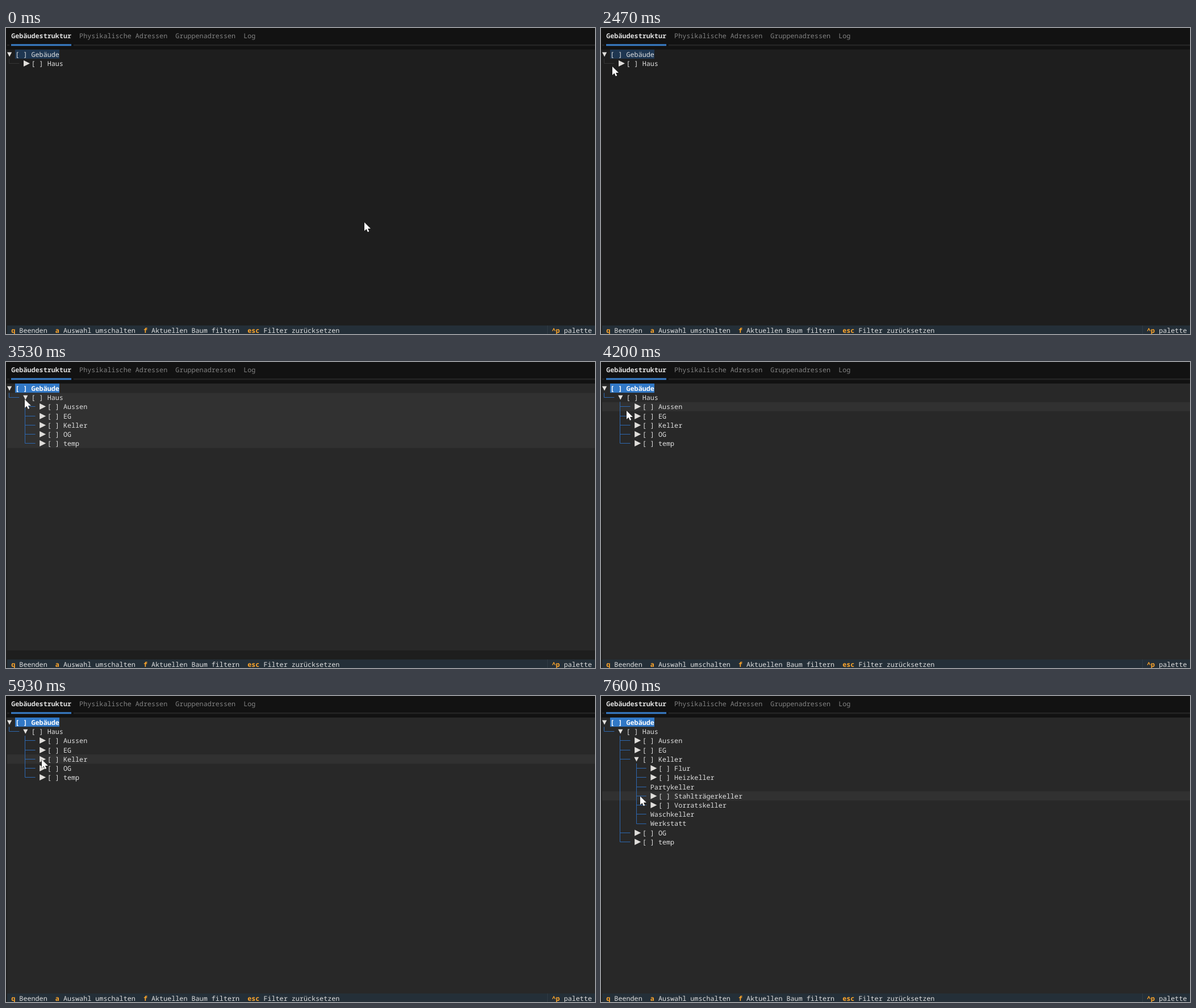
These frames come from a looping animation (1037x540 px, 8 s). An HTML page:

```html
<!DOCTYPE html>
<html lang="de">
<head>
<meta charset="utf-8">
<title>Gebäudestruktur</title>
<style>
  html, body { margin: 0; width: 100%; height: 100%; overflow: hidden; background: #1e1e1e; }
  svg { display: block; width: 1037px; height: 540px; }
  text {
    font: 11.75px "Noto Sans Mono", "DejaVu Sans Mono", monospace;
    text-rendering: geometricPrecision; fill: #e0e0e0; white-space: pre;
  }
  .bold { font-weight: 700; }
  .dim { fill: #828282; }
  .key { fill: #ffa62b; font-weight: 700; }
  .mark { fill: #e0dedb; }
  .guide { fill: none; stroke: #363636; }
  .sel { fill: #1e3651; }
  .focus .guide { stroke: #2d68b0; }
  .focus .sel { fill: #3178c6; }
  .focus .root { font-weight: 700; fill: #fff; }
</style>
</head>
<body>
<svg id="stage" viewBox="0 0 1037 540"></svg>
<script>
const COL = 7.05, ROW = 16.23, LEFT = 2.2, TOP = 38.3;
const stage = document.getElementById('stage');
const colX = c => LEFT + c * COL;
const rowY = r => TOP + r * ROW;

function add(parent, tag, attrs, text) {
  const el = document.createElementNS('http://www.w3.org/2000/svg', tag);
  for (const k in attrs) el.setAttribute(k, attrs[k]);
  if (text) el.textContent = text;
  parent.appendChild(el);
  return el;
}
const box = (parent, x, y, width, height, fill) =>
  add(parent, 'rect', { x, y, width, height, fill });
const label = (parent, col, row, text, cls = '') =>
  add(parent, 'text', { x: colX(col), y: rowY(row) + 12.6, class: cls }, text);

// Background, tabs and footer
box(stage, 0, 0, 1037, 38, '#121212');
box(stage, 2, 29, 4, 2.5, '#242424');
box(stage, 119, 29, 918, 2.5, '#242424');
box(stage, 9, 28.5, 106, 3, '#3a7fcb');
label(stage, 1, -2, 'Gebäudestruktur', 'bold');
label(stage, 18, -2, 'Physikalische Adressen', 'dim');
label(stage, 42, -2, 'Gruppenadressen', 'dim');
label(stage, 59, -2, 'Log', 'dim');

const panel = box(stage, 2, 38, 1035, 487, '#1e1e1e');
const hover = box(stage, 2, 0, 1035, 0, '#272727');

box(stage, 2, 525, 1035, 15, '#242f38');
box(stage, 953, 525, 1, 15, '#303c45');
[
  [1, 'q', 3, 'Beenden'],
  [12, 'a', 14, 'Auswahl umschalten'],
  [34, 'f', 36, 'Aktuellen Baum filtern'],
  [60, 'esc', 64, 'Filter zurücksetzen'],
  [136, '^p', 139, 'palette']
].forEach(([kc, key, tc, text]) => {
  label(stage, kc, 30, key, 'key');
  label(stage, tc, 30, text);
});

// Tree rows: depth, mark (v open, > closed, - leaf), name
function buildTree(rows) {
  const g = add(stage, 'g', {});
  add(g, 'rect', { x: 16, y: 38, width: 78, height: 16.2, class: 'sel' });
  const parents = [];
  rows.forEach(([depth, mark, name], r) => {
    const mid = Math.round(rowY(r) + 7.7) + 0.5;
    const x = colX(depth * 4);
    parents[depth] = r;
    if (depth) {
      const gx = Math.floor(colX(depth * 4 - 3.5)) + 0.5;
      const y0 = rowY(parents[depth - 1] + 1);
      add(g, 'path', { class: 'guide', d: `M${gx} ${y0}V${mid}H${colX(depth * 4 - 1)}` });
    }
    if (mark === '-') return label(g, depth * 4, r, name);
    const shape = mark === 'v'
      ? `M${x - 0.2} ${mid - 3.7}h8.2l-4.1 8z`
      : `M${x + 0.6} ${mid - 5.5}l11 5.5l-11 5.5z`;
    add(g, 'path', { class: 'mark', d: shape });
    label(g, depth * 4 + 2, r, '[ ] ' + name, depth ? '' : 'root');
  });
  return g;
}

const root = [0, 'v', 'Gebäude'];
const upper = [root, [1, 'v', 'Haus'], [2, '>', 'Aussen'], [2, '>', 'EG']];
const lower = [[2, '>', 'OG'], [2, '>', 'temp']];
const trees = [
  [root, [1, '>', 'Haus']],
  [...upper, [2, '>', 'Keller'], ...lower],
  [...upper, [2, 'v', 'Keller'],
    [3, '>', 'Flur'], [3, '>', 'Heizkeller'], [3, '-', 'Partykeller'],
    [3, '>', 'Stahlträgerkeller'], [3, '>', 'Vorratskeller'],
    [3, '-', 'Waschkeller'], [3, '-', 'Werkstatt'], ...lower]
].map(buildTree);

const pointer = add(stage, 'path', {
  d: 'M0 0V15L3.5 11.8L5.9 17L8.3 16L6 10.9H11Z',
  fill: '#fff', stroke: '#151515', 'stroke-width': 0.8, 'paint-order': 'stroke'
});

// Pointer path: tick (1/15 s), x, y
const path = [
  [0, 631, 343], [19, 631, 343], [20, 560, 312], [21, 330, 218], [22, 175, 157],
  [27, 175, 157], [28, 140, 147], [31, 26, 115], [34, 26, 115], [35, 23, 96],
  [37, 20, 68], [46, 32, 66], [47, 32, 66], [48, 33, 65], [52, 33, 65],
  [53, 33, 66], [55, 33, 66], [68, 53, 99], [72, 59, 103], [79, 59, 103],
  [83, 61, 112], [84, 61, 112], [89, 63, 112], [103, 63, 112], [114, 69, 177]
];
const HOVER = 38, OPEN_HOUSE = 53, LEAVE_HOUSE = 56, OPEN_CELLAR = 97, LEAVE_CELLAR = 104;

function pointerAt(tick) {
  const i = path.findIndex(p => p[0] > tick);
  if (i < 0) return path[path.length - 1].slice(1);
  const a = path[i - 1], b = path[i];
  const k = (tick - a[0]) / (b[0] - a[0]);
  return [1, 2].map(n => Math.round(a[n] + (b[n] - a[n]) * k));
}

// A freshly opened node stays lit with its children until the pointer moves.
function hoverRows(tick, y) {
  if (tick < HOVER) return [0, 0];
  if (tick >= OPEN_HOUSE && tick < LEAVE_HOUSE) return [1, 7];
  if (tick >= OPEN_CELLAR && tick < LEAVE_CELLAR) return [4, 12];
  const r = Math.floor((y - TOP) / ROW);
  return [r, r + 1];
}

function render(ms) {
  const tick = Math.floor((ms + 3.4) * 0.015);
  const [x, y] = pointerAt(tick);
  const [from, to] = hoverRows(tick, y);
  const focused = tick >= OPEN_HOUSE;
  const state = tick >= OPEN_CELLAR ? 2 : focused ? 1 : 0;

  pointer.setAttribute('transform', `translate(${x} ${y})`);
  stage.setAttribute('class', focused ? 'focus' : '');
  panel.setAttribute('fill', focused ? '#282828' : '#1e1e1e');
  panel.setAttribute('height', focused && tick < LEAVE_HOUSE ? 471 : 487);
  hover.setAttribute('fill', focused ? '#313131' : '#272727');
  hover.setAttribute('y', rowY(from));
  hover.setAttribute('height', (to - from) * ROW);
  trees.forEach((g, i) => g.setAttribute('display', i === state ? 'inline' : 'none'));
}

const start = performance.now();
function loop() {
  render((performance.now() - start) % 8000);
  requestAnimationFrame(loop);
}
loop();
</script>
</body>
</html>
```
